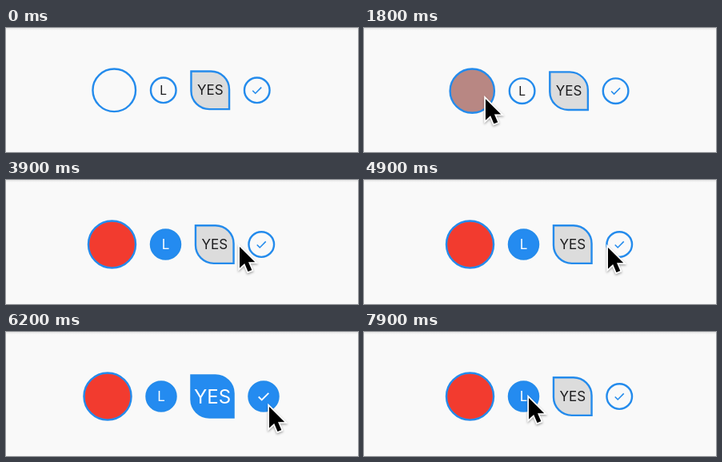
Animation, 440 px wide and 156 px high, one loop 8000 ms. Source, as an HTML page with a canvas:

```html
<!DOCTYPE html>
<html lang="en">
<head>
<meta charset="utf-8">
<title>Round check boxes</title>
<style>
html, body { margin: 0; width: 100%; height: 100%; overflow: hidden; background: #f9f9f9; }
canvas { display: block; width: 440px; height: 156px; }
</style>
</head>
<body>
<canvas id="stage"></canvas>
<script>
const W = 440, H = 156, LOOP = 8000, STEP = 100;
const BLUE = [36, 139, 240], RED = [242, 59, 47], GREY = [220, 220, 220];
const INK = '#1c1c1e', LINE = '#248bec';
const FADE = 260, GROW = 5.5, GAP = 16.5, TOP = 50.3, MID = 219;

const canvas = document.getElementById('stage');
const dpr = window.devicePixelRatio || 1;
canvas.width = W * dpr;
canvas.height = H * dpr;
const ctx = canvas.getContext('2d');

// Each box switches on at `on` and, if given, off at `off`.
const boxes = [
  { size: 56, on: 1720, fill: RED },
  { size: 34, on: 3130, fill: BLUE, text: 'L', font: [15.5, 17] },
  { size: 50, on: 4920, off: 7330, fill: BLUE, base: GREY, text: 'YES', font: [17, 24], leaf: true },
  { size: 34, on: 5540, off: 6630, fill: BLUE, tick: true }
];

// Pointer stops: time, x, y, sideways bulge is given by the dip in y.
const stops = [
  [0, 205, 157, 0], [800, 159, 90, 0], [1100, 159, 90, 0], [1300, 150.5, 88, 0],
  [1750, 150.5, 88, 0], [2700, 203, 82, 8], [3150, 203, 82, 0], [3900, 291, 83, 2],
  [4300, 291, 83, 0], [4500, 269, 83, 0], [4600, 269, 83, 0], [4900, 304, 84, 0],
  [5200, 315, 84, 0], [5500, 315, 84, 0], [6200, 328, 93, 0], [6600, 328, 93, 0],
  [7100, 262, 88, 17], [7300, 262, 88, 0], [7900, 205, 82, 0], [8000, 205, 82, 0]
];

const clamp = v => Math.min(1, Math.max(0, v));
const mix = (a, b, p) => a + (b - a) * p;
const easeOut = p => 1 - (1 - p) * (1 - p);
const smooth = p => p * p * (3 - 2 * p);

function level(box, t) {
  const up = clamp((t - box.on) / FADE);
  return box.off ? up - clamp((t - box.off) / FADE) : up;
}

function isOn(box, t) {
  return t >= box.on && !(box.off && t >= box.off);
}

function fillColor(box, p) {
  const from = box.base || [0, 0, 0];
  const rgb = from.map((c, i) => Math.round(mix(c, box.fill[i], p)));
  return `rgba(${rgb},${box.base ? 1 : p})`;
}

function outline(x, y, size, leaf, inset) {
  const r = leaf ? 24 - inset : size / 2 - inset;
  const sharp = leaf ? 0 : r;
  ctx.beginPath();
  ctx.roundRect(x + inset, y + inset, size - 2 * inset, size - 2 * inset, [sharp, r, sharp, r]);
}

function drawTick(cx, cy, p, on) {
  const s = mix(1, 1.14, p);
  ctx.beginPath();
  ctx.moveTo(cx - 5.5 * s, cy + 0.4 * s);
  ctx.lineTo(cx - 2 * s, cy + 3.9 * s);
  ctx.lineTo(cx + 5.5 * s, cy - 3.7 * s);
  ctx.strokeStyle = on ? '#fff' : LINE;
  ctx.lineWidth = 1.6 * s;
  ctx.stroke();
}

function drawBox(box, x, cy, p, t) {
  const size = box.size + GROW * p, y = cy - size / 2, cx = x + size / 2;
  const on = isOn(box, t);
  outline(x, y, size, box.leaf, 1);
  ctx.fillStyle = fillColor(box, on ? easeOut(p) : p);
  ctx.fill();
  outline(x, y, size, box.leaf, 1.2);
  ctx.strokeStyle = LINE;
  ctx.lineWidth = 2.4;
  ctx.stroke();
  if (box.text) {
    const px = box.font[on ? 1 : 0];
    ctx.font = `${px}px Inter, Roboto, sans-serif`;
    ctx.textAlign = 'center';
    ctx.fillStyle = on ? '#fff' : INK;
    ctx.fillText(box.text, cx, cy + px * 0.364);
  }
  if (box.tick) drawTick(cx, cy, p, on);
}

function drawPointer(t) {
  const i = stops.findIndex(s => s[0] > t);
  const a = stops[i - 1], b = stops[i];
  const raw = (t - a[0]) / (b[0] - a[0]), p = smooth(raw);
  const x = mix(a[1], b[1], p);
  const y = mix(a[2], b[2], p) + b[3] * Math.sin(Math.PI * p);
  const arrow = new Path2D('M0 0V15.6L3.6 12.2L6.1 18.2L8.9 17L6.4 11.2H11.2Z');
  ctx.save();
  ctx.translate(x + 1, y + 1);
  ctx.scale(1.72, 1.72);
  ctx.lineJoin = 'miter';
  ctx.shadowColor = 'rgba(0,0,0,.35)';
  ctx.shadowBlur = 3 * dpr;
  ctx.shadowOffsetY = 1.5 * dpr;
  ctx.strokeStyle = '#fff';
  ctx.lineWidth = 2;
  ctx.stroke(arrow);
  ctx.shadowColor = 'transparent';
  ctx.fillStyle = '#000';
  ctx.fill(arrow);
  ctx.restore();
}

function draw(t) {
  ctx.setTransform(dpr, 0, 0, dpr, 0, 0);
  ctx.fillStyle = '#f9f9f9';
  ctx.fillRect(0, 0, W, H);
  const shade = ctx.createLinearGradient(0, 0, 0, 3);
  shade.addColorStop(0, '#e4e4e4');
  shade.addColorStop(1, '#f9f9f9');
  ctx.fillStyle = shade;
  ctx.fillRect(0, 0, W, 3);

  const levels = boxes.map(b => level(b, t));
  const sizes = boxes.map((b, i) => b.size + GROW * levels[i]);
  const total = sizes.reduce((sum, s) => sum + s, GAP * (boxes.length - 1));
  const cy = TOP + Math.max(...sizes) / 2;
  let x = MID - total / 2;
  boxes.forEach((b, i) => {
    drawBox(b, x, cy, levels[i], t);
    x += sizes[i] + GAP;
  });
  if (t > 0) drawPointer(t);
}

const start = performance.now();
function tick() {
  const t = (performance.now() - start) % LOOP;
  draw(Math.floor(t / STEP) * STEP);
  requestAnimationFrame(tick);
}
tick();
</script>
</body>
</html>
```
